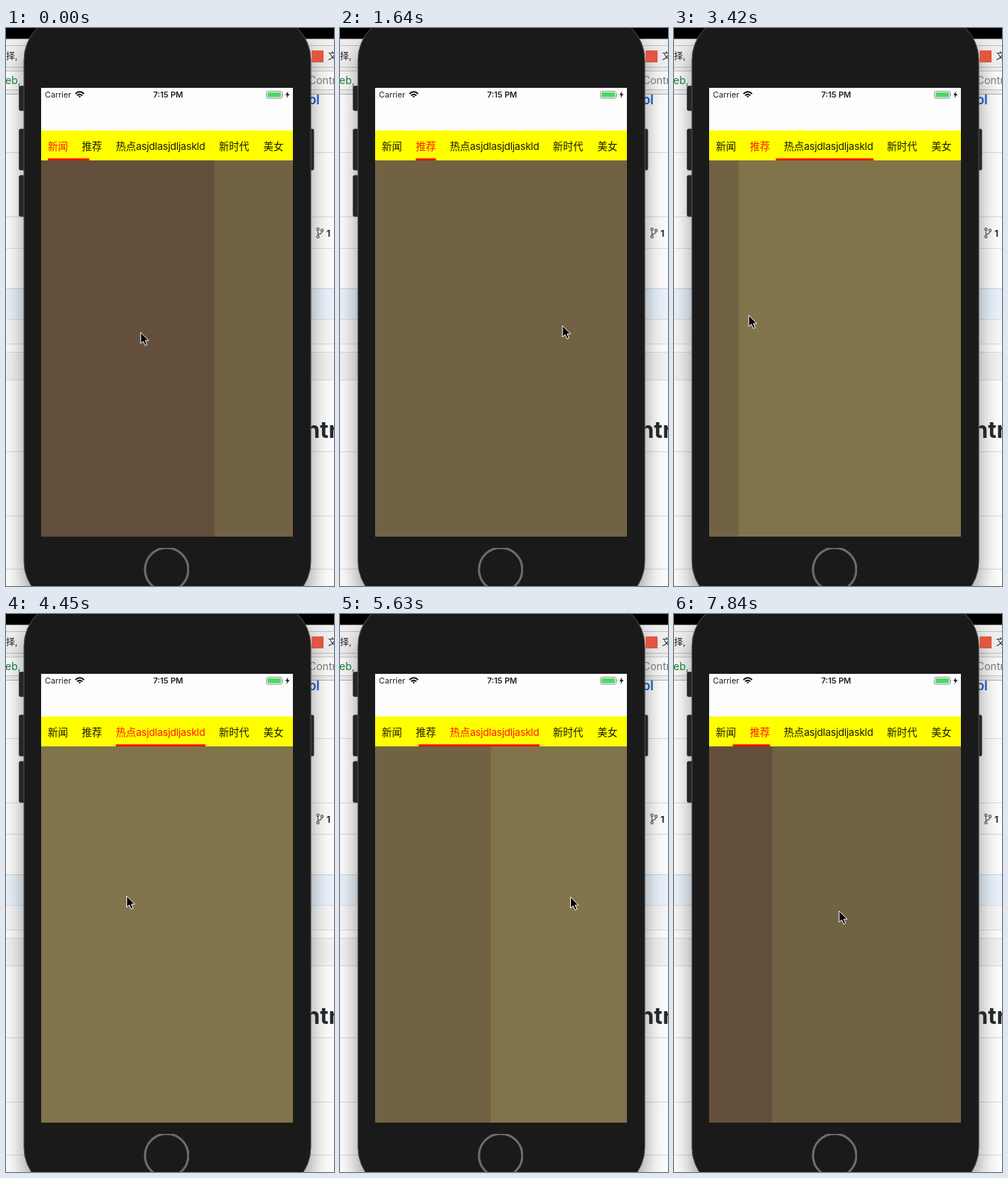
Animation of 439 by 746 pixels, one loop 7990 ms. Source, as an HTML page:

```html
<!DOCTYPE html>
<html lang="zh">
<head>
<meta charset="utf-8">
<title>Paged tabs</title>
<style>
  html, body { margin: 0; width: 100%; height: 100%; overflow: hidden; background: #fff; }
  svg { display: block; width: 100vw; height: 100vh; }
  text { font-family: Inter, "Noto Sans CJK SC", "Noto Sans CJK", sans-serif; white-space: pre; }
  .tabs text { font-size: 13.5px; fill: #1a1a00; }
  .tabs text.on { fill: #ff1a00; }
  .status { font-size: 10.8px; fill: #222; }
  .rule { stroke: #dcdcdc; }
</style>
</head>
<body>
<svg viewBox="0 0 439 746">
  <defs>
    <filter id="shade" x="-20%" y="-10%" width="140%" height="120%">
      <feDropShadow dx="0" dy="18" stdDeviation="15" flood-opacity=".42"/>
    </filter>
    <clipPath id="screen"><rect x="47" y="177" width="337" height="503"/></clipPath>
    <clipPath id="home"><rect x="184" y="695" width="61" height="51"/></clipPath>
  </defs>

  <!-- browser behind the phone -->
  <rect width="439" height="746" fill="#fdfdfd"/>
  <rect y="14" width="439" height="75" fill="#efefef"/>
  <rect width="439" height="14.5" fill="#000"/>
  <path d="M0 23.5H439M0 52.5H439" stroke="#c2c2c2"/>
  <rect x="-5" y="57.5" width="450" height="25" fill="#fbfbfb" stroke="#c8c8c8"/>
  <path d="M0 88.5H439" stroke="#b2b2b2"/>
  <rect y="348" width="439" height="41" fill="#eaf3fb"/>
  <rect y="390" width="439" height="32" fill="#f7f7f7"/>
  <rect y="433" width="439" height="37" fill="#f3f3f3"/>
  <path class="rule" d="M0 166.5H439M0 252.5H439M0 294.5H439M0 389.5H439M0 422.5H439M0 433.5H439M0 470.5H439M0 566.5H439M0 652.5H439M0 723.5H439"/>
  <path d="M0 348.5H439" stroke="#c3d9ea"/>

  <!-- phone -->
  <rect x="24" y="-17" width="384" height="790" rx="60" fill="#1a1a1a" filter="url(#shade)"/>
  <g font-size="12">
    <text x="0" y="42" fill="#222">择,</text>
    <text x="431" y="42" fill="#222">文</text>
    <rect x="409" y="30" width="16" height="16" rx="1" fill="#e05640"/>
    <text x="-1" y="75" font-size="14" fill="#187a3b">eb,</text>
    <text x="405" y="75" font-size="14" fill="#777">Contr</text>
    <text x="405" y="102" font-size="17" font-weight="600" fill="#1650b8">ol</text>
    <text x="429" y="279" font-weight="700" fill="#222">1</text>
    <text x="401" y="548" font-size="31" font-weight="700" fill="#24292e">ntr</text>
    <g fill="none" stroke="#555" stroke-width="1.2">
      <circle cx="417.5" cy="269" r="1.6"/><circle cx="417.5" cy="279" r="1.6"/><circle cx="423" cy="270.5" r="1.6"/>
      <path d="M417.5 270.6V277.4M423 272Q423 275 417.5 276"/>
    </g>
  </g>
  <g fill="#252525" stroke="#3d3d3d" stroke-width=".7">
    <rect x="17.5" y="77.5" width="9" height="33" rx="2"/>
    <rect x="17.5" y="135" width="9" height="55" rx="2"/>
    <rect x="17.5" y="197" width="9" height="55" rx="2"/>
    <rect x="405" y="135" width="7" height="55" rx="2"/>
  </g>
  <rect x="24" y="-17" width="384" height="790" rx="60" fill="#1a1a1a" stroke="#555"/>
  <circle cx="215" cy="724" r="29" fill="none" stroke="#6c6c6c" stroke-width="3" clip-path="url(#home)"/>

  <!-- status and navigation bars -->
  <rect x="47" y="80" width="337" height="57" fill="#fdfdfd"/>
  <text class="status" x="52" y="93">Carrier</text>
  <text class="status" x="217" y="93" text-anchor="middle" font-weight="600">7:15 PM</text>
  <g fill="none" stroke="#111" stroke-width="2">
    <path d="M93 88Q98.7 82.5 104.4 88M95.2 90.4Q98.7 87 102.2 90.4"/>
    <path d="M97 91.3L98.7 93.2L100.4 91.3Q98.7 90 97 91.3Z" fill="#111" stroke="none"/>
  </g>
  <rect x="348.5" y="84.5" width="21" height="9.5" rx="2" fill="none" stroke="#888" stroke-width=".9"/>
  <rect x="350" y="86" width="18" height="6.5" rx="1" fill="#4cd964"/>
  <path d="M370.5 87.5q1.5 1.7 0 3.4z" fill="#888"/>
  <path d="M377.5 84.5L374 89.8H376.5L375.3 94L379.5 88.3H376.9Z" fill="#111"/>

  <!-- tabs and pages -->
  <rect x="47" y="137" width="337" height="40" fill="#ff0"/>
  <g class="tabs">
    <text x="56" y="162.5">新闻</text>
    <text x="101.5" y="162.5">推荐</text>
    <text x="147" y="162.5">热点<tspan letter-spacing="-.22">asjdlasjdljaskld</tspan></text>
    <text x="285" y="162.5">新时代</text>
    <text x="344.5" y="162.5">美女</text>
  </g>
  <rect id="bar" y="174.3" height="2.7" fill="red"/>
  <g clip-path="url(#screen)">
    <g id="pages">
      <rect x="47" y="177" width="338" height="503" fill="#644f3d"/>
      <rect x="384" y="177" width="338" height="503" fill="#726244"/>
      <rect x="721" y="177" width="338" height="503" fill="#81744b"/>
    </g>
  </g>
  <path id="cursor" d="M0 0V15L3.5 12L6 17.600L8.600 16.500L6.200 11H10.800Z" stroke="#fff"/>
</svg>
<script>
  const LOOP = 7990, STEPS = 54, STEP = 147.9, PAGE = 337;
  const GAIN = 1.055; // pages run slightly ahead of the pointer
  const $ = id => document.getElementById(id);
  const labels = document.querySelectorAll('.tabs text');

  // left and right edge of the first three tabs
  const edges = [[56, 83], [101.5, 128.5], [147, 267]];

  // Each swipe drags from one point to another between the steps grab and drop,
  // then the page settles at the step end.
  const swipes = [
    { page: 0, to: 1, grab: -3.2, drop: 3, end: 8, p: [279.6, 411], q: [87, 403] },
    { page: 1, to: 2, grab: 12.4, drop: 20, end: 26, p: [298, 398], q: [100, 384] },
    { page: 2, to: 1, grab: 31.3, drop: 39.8, end: 45, p: [161.6, 377], q: [348, 378.5] },
    { page: 1, to: 0, grab: 49, drop: 53, end: 59, p: [141, 397], q: [221, 397] }
  ];

  const mix = (a, b, k) => a + (b - a) * k;
  const span = (a, b, v) => Math.min(1, Math.max(0, (v - a) / (b - a)));
  const easeOut = (k, power) => 1 - (1 - k) ** power;
  const between = (a, b, k) => a.map((v, i) => mix(v, b[i], k));

  function pointerAt(step, swipe, last) {
    if (step >= swipe.grab || !last) return between(swipe.p, swipe.q, span(swipe.grab, swipe.drop, step));
    return between(last.q, swipe.p, easeOut(span(last.end + 1, swipe.grab - 1, step), 4));
  }

  function scrollAt(step, { page, to, grab, drop, end, p, q }) {
    const pull = (p[0] - q[0]) * GAIN * span(grab, drop, step);
    const settle = easeOut(span(drop, end, step), 1.7);
    return mix(page * PAGE + pull, to * PAGE, settle);
  }

  // the bar stretches to the next tab, then its tail follows
  function barAt(offset) {
    const from = Math.min(1, Math.floor(offset / PAGE));
    const part = offset / PAGE - from;
    const [a, b] = [edges[from], edges[from + 1]];
    return [mix(a[0], b[0], span(.5, 1, part)), mix(a[1], b[1], span(0, .5, part))];
  }

  function draw(time) {
    const step = Math.min(STEPS - 1, Math.floor(time % LOOP / STEP));
    const n = swipes.findIndex(s => step < s.end + 1);
    const swipe = swipes[n];
    const [x, y] = pointerAt(step, swipe, swipes[n - 1]);
    const offset = scrollAt(step, swipe);
    const [left, right] = barAt(offset);
    const picked = step < swipe.end ? swipe.page : swipe.to;

    $('bar').setAttribute('x', left);
    $('bar').setAttribute('width', right - left);
    $('pages').setAttribute('transform', `translate(${-offset})`);
    $('cursor').setAttribute('transform', `translate(${x} ${y})`);
    labels.forEach((label, i) => label.classList.toggle('on', i === picked));
  }

  const start = performance.now();
  function tick() {
    draw(performance.now() - start);
    requestAnimationFrame(tick);
  }
  tick();
</script>
</body>
</html>
```
